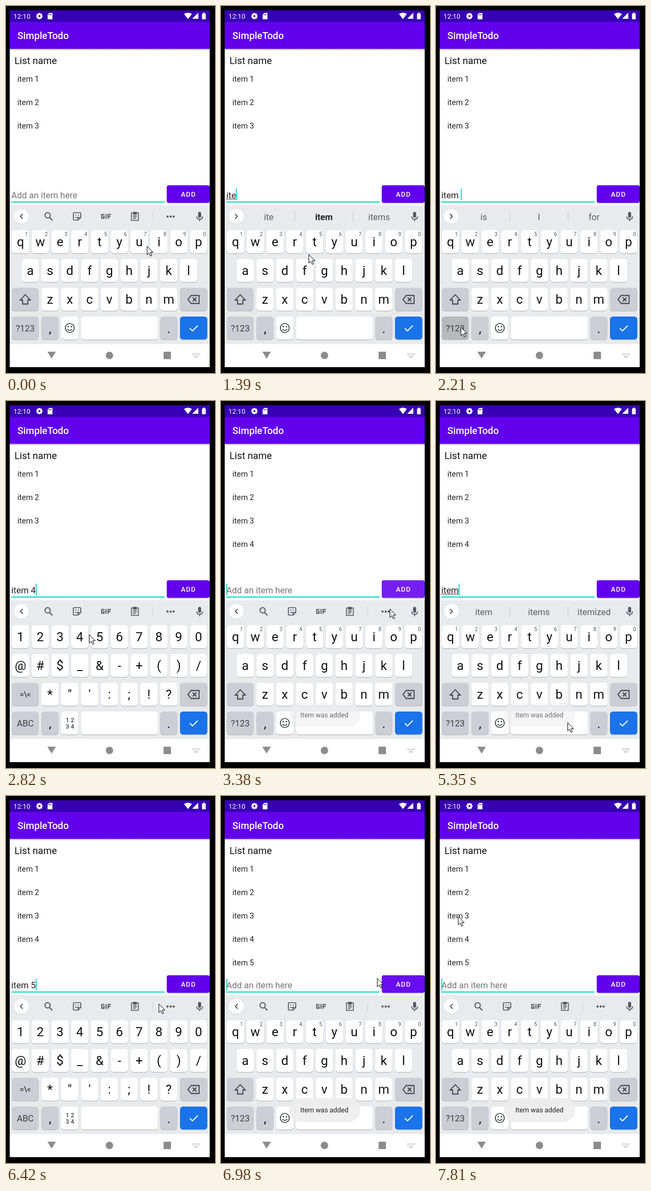
Animation, 394 px wide and 689 px high, one loop 8 s. Source, as an HTML page with a canvas:

```html
<!DOCTYPE html>
<html lang="en">
<head>
<meta charset="utf-8">
<title>Todo list</title>
<style>
html, body { margin: 0; height: 100%; overflow: hidden; background: #000; }
canvas { display: block; }
</style>
</head>
<body>
<canvas id="stage" width="394" height="689"></canvas>
<script>
const g = document.getElementById('stage').getContext('2d');
const LOOP = 8000;
const INK = '#202124', ICON = '#54575b', TEAL = '#03dac5', PURPLE = '#6200ee';

// time, typed text, symbol keyboard, suggestions, list length
const states = [
  [0, '', 0, '', 3],
  [540, 'i', 0, 'in I it', 3],
  [1060, 'it', 0, "its it it's", 3],
  [1310, 'ite', 0, 'ite item items', 3],
  [1670, 'item', 0, 'item items itemized', 3],
  [1930, 'item ', 0, 'is I for', 3],
  [2270, 'item ', 1, 'is I for', 3],
  [2740, 'item 4', 1, '', 3],
  [3160, '', 0, '', 4],
  [3610, 'i', 0, 'in I it', 4],
  [4110, 'it', 0, "its it it's", 4],
  [4520, 'ite', 0, 'ite item items', 4],
  [5080, 'item', 0, 'item items itemized', 4],
  [5440, 'item ', 0, 'is I for', 4],
  [5800, 'item ', 1, 'is I for', 4],
  [6110, 'item 5', 1, '', 4],
  [6660, '', 0, '', 5],
];

// pointer moves: start, end, x, y
const moves = [
  [0, 0, 266, 451], [280, 500, 290, 445], [600, 1010, 178, 446],
  [1080, 1270, 112, 438], [1270, 1630, 316, 547], [1690, 1890, 220, 607],
  [1950, 2170, 47, 603], [2270, 2650, 139, 447], [2760, 3090, 340, 352],
  [3240, 3530, 295, 432], [3640, 4060, 178, 458], [4150, 4460, 107, 445],
  [4560, 5030, 306, 546], [5140, 5360, 248, 604], [5470, 5730, 47, 603],
  [5820, 6080, 178, 455], [6180, 6567, 340, 360], [6760, 7650, 46, 244],
  [7670, 7810, 42, 226],
];

const clamp = v => Math.max(0, Math.min(1, v));
const ramp = (t, a, b) => clamp((t - a) / (b - a));
const ease = u => u * u * (3 - 2 * u);

function box(x, y, w, h, color, r = 0) {
  g.fillStyle = color;
  g.beginPath();
  g.roundRect(x, y, w, h, r);
  g.fill();
}

function disc(x, y, r, color) {
  g.fillStyle = color;
  g.beginPath();
  g.arc(x, y, r, 0, 7);
  g.fill();
}

function text(s, x, y, size, color = INK, align = 'left', weight = 400) {
  g.font = `${weight} ${size}px Roboto, sans-serif`;
  g.fillStyle = color;
  g.textAlign = align;
  g.fillText(s, x, y);
}

// draws an SVG path at x, y: stroked when width is given, filled otherwise
function icon(d, x, y, color, width) {
  const p = new Path2D(d);
  g.save();
  g.translate(x, y);
  g.fillStyle = g.strokeStyle = color;
  g.lineWidth = width || 1;
  if (width) g.stroke(p); else g.fill(p);
  g.restore();
}

function drawStatus() {
  box(7, 8, 377, 22, '#3700b3');
  text('12:10', 14, 24, 12.8, '#fff');
  for (let i = 0; i < 4; i++) {
    g.save();
    g.translate(63, 19);
    g.rotate(i * Math.PI / 4);
    box(-1.5, -6, 3, 12, '#fff', 0.5);
    g.restore();
  }
  disc(63, 19, 4.4, '#fff');
  disc(63, 19, 1.9, '#3700b3');
  icon('M-1.5-6H4.5V6H-4.5V-3Z', 83, 19, '#fff');
  for (const x of [81, 83, 85]) box(x - 0.5, 15, 1, 2.5, '#3700b3');
  icon('M0 6L-7.5-3.5Q0-8.5 7.5-3.5Z', 343, 18.5, '#fff');
  icon('M5.5-6V5.5H-6Z', 357, 18.5, '#fff');
  box(369.5, 14, 7, 11, '#fff', 1);
  box(371.5, 12.5, 3, 2, '#fff');
}

function drawApp(t, s) {
  const [since, typed, , , count] = s;
  box(7, 80, 377, 294, '#fff');
  const shade = g.createLinearGradient(0, 80, 0, 84);
  shade.addColorStop(0, '#0004');
  shade.addColorStop(1, '#0000');
  box(7, 80, 377, 4, shade);
  box(7, 29, 377, 51.5, PURPLE);
  text('SimpleTodo', 21.5, 62, 18.3, '#fff', 'left', 500);
  text('List name', 16, 109, 18.3, '#111');
  for (let i = 0; i < count; i++) text('item ' + (i + 1), 21.5, 142 + 44 * i, 14.67);

  text(typed || 'Add an item here', 10, 360.5, 16.5, typed ? INK : '#757575');
  const w = typed ? g.measureText(typed).width : 0;
  if (typed && !/ /.test(typed)) box(10, 362, w, 1, '#333');
  if (since && (t - since) % 1000 < 500) box(10 + w, 343, 1.8, 22, TEAL);
  box(10, 367, 289, 2, TEAL);

  box(303, 338, 81, 33, '#0003', 4);
  box(303, 336.5, 81, 33, PURPLE, 4);
  for (const c of [3130, 6640]) {
    const glow = ramp(t, c, c + 60) * (1 - ramp(t, c + 240, c + 400));
    if (glow) box(303, 336.5, 81, 33, `rgba(255,255,255,${0.13 * glow})`, 4);
  }
  g.letterSpacing = '1.15px';
  text('ADD', 344, 358, 12.8, '#fff', 'center', 500);
  g.letterSpacing = '0px';
}

function drawTools() {
  icon('M2.5-4.5L-2 0L2.5 4.5', 29, 395, ICON, 1.8);
  icon('M3.5-2A5 5 0 1 1-6.5-2A5 5 0 1 1 3.5-2M2 2L7.5 7.5', 80, 395, ICON, 2);
  icon('M-5.5-7H5.5Q7-7 7-5.5V2L2 7H-5.5Q-7 7-7 5.5V-5.5Q-7-7-5.5-7M7 2H2V7M-3.5 1Q-1 4 2 1', 134, 395, ICON, 1.7);
  disc(131.5, 392.5, 1.1, ICON);
  disc(136.5, 392.5, 1.1, ICON);
  icon('M-2-3.5H-7V3.5H-2.8V0H-4.5M1-4.5V4.5M5 4.5V-3.5H10.5M5 .3H9.5', 187.5, 395, ICON, 2);
  icon('M-6.5-6.5H6.5V7.5H-6.5ZM-3.5-1.5H3.5M-3.5 1.3H3.5M-3.5 4H1.5', 243, 395, ICON, 1.6);
  box(239.5, 386.5, 7, 5, ICON, 1);
  box(276, 386, 1, 19, '#d3d5d8');
  for (const x of [304.5, 310.5, 316]) disc(x, 395.3, 2, ICON);
}

function drawSuggestions(words) {
  icon('M-2.5-4.5L2 0L-2.5 4.5', 29, 395, ICON, 1.8);
  words.split(' ').forEach((word, i) => {
    const bold = word === 'item' && i === 1;
    text(word, 90 + 104 * i, 402, 16.5, bold ? INK : '#5a5d61', 'center', bold ? 700 : 400);
  });
  box(138.5, 384, 1, 22, '#c6c8cb');
  box(248.5, 384, 1, 22, '#c6c8cb');
}

function key(x, row, w, color = '#fff') {
  const y = 421 + 54 * row;
  box(x, y + 1, w, 43.3, '#b9bbbf', 5.5);
  box(x, y, w, 43, color, 5.5);
}

function keyRow(chars, x, row, hints) {
  [...chars].forEach((c, i) => {
    const kx = x + 37.3 * i;
    key(kx, row, 32.5);
    text(c, kx + 16.2, 450.5 + 54 * row, 24, '#111', 'center');
    if (hints) text((i + 1) % 10, kx + 27.5, 432, 10, ICON, 'center');
  });
}

function drawKeyboard(t, s) {
  const symbols = s[2], gray = '#cbced4';
  box(7, 374, 377, 260, '#e8eaed');
  disc(29, 396, 13.8, '#d3d5d8');
  disc(29, 395, 13.8, '#fff');
  if (s[3]) drawSuggestions(s[3]); else drawTools();
  box(362.2, 386.5, 5.6, 11, ICON, 2.8);
  icon('M-5.5 0Q-5.5 5.5 0 5.5Q5.5 5.5 5.5 0M0 5.5V9', 365, 395, ICON, 1.7);

  keyRow(symbols ? '1234567890' : 'qwertyuiop', 11, 0, !symbols);
  keyRow(symbols ? '@#$_&-+()/' : 'asdfghjkl', symbols ? 11 : 29.5, 1);
  keyRow(symbols ? '*"\':;!?' : 'zxcvbnm', 66.7, 2);

  key(11, 2, 50.5, gray);
  if (symbols) text('=\\<', 36.3, 556, 14, '#3c4043', 'center', 500);
  else icon('M0-9L9.5 1H5V8.5H-5V1H-9.5Z', 36.3, 551, '#3c4043', 1.8);
  key(328, 2, 51.5, gray);
  icon('M-4.5-7.5H10.5V7.5H-4.5L-10.5 0ZM-1.5-3.5L5.5 3.5M5.5-3.5L-1.5 3.5', 353.5, 551, '#3c4043', 1.8);

  const down = [2270, 5800].some(e => t >= e - 80 && t < e);
  key(11, 3, 50.5, down ? '#b7babd' : gray);
  text(symbols ? 'ABC' : '?123', 36.3, 610.5, 16.5, '#3c4043', 'center');
  key(66.7, 3, 32.5, gray);
  text(',', 83, 613.5, 24, '#111', 'center');
  key(104, 3, 32.5);
  if (symbols) {
    text('1 2', 120.5, 603, 11.5, '#3c4043', 'center', 500);
    text('3 4', 120.5, 614.5, 11.5, '#3c4043', 'center', 500);
  } else {
    icon('M8.5 0A8.5 8.5 0 1 1-8.5 0A8.5 8.5 0 1 1 8.5 0M-4.5 2Q0 7.5 4.5 2', 120.3, 604.5, '#3c4043', 1.7);
    disc(117.3, 602, 1.4, '#3c4043');
    disc(123.3, 602, 1.4, '#3c4043');
  }
  key(141.3, 3, 145);
  key(290.7, 3, 32.5, gray);
  text('.', 307, 613.5, 24, '#111', 'center');
  key(328, 3, 51.5, '#1a73e8');
  icon('M-7.5 0L-2.5 5L7.5-5', 354, 605, '#fff', 1.9);
}

function drawNav() {
  const c = '#8c8c8c';
  box(7, 634, 377, 44, '#fff');
  box(7, 634, 377, 1, '#f0f0f0');
  icon('M-8-6.5H8L0 6.5Z', 86, 655.5, c);
  disc(195, 656, 7, c);
  box(297, 649, 14, 14, c, 1);
  for (let i = 0; i < 6; i++)
    for (let j = 0; j < 2; j++) box(351 + 2.6 * i, 652 + 2.7 * j, 1.4, 1.4, '#aaa');
  box(354, 658, 8, 1.4, '#aaa');
}

function drawToast(t) {
  const shown = ramp(t, 3290, 3430) * (1 - ramp(t, 5290, 5450)) + ramp(t, 6790, 6930);
  if (!shown) return;
  g.globalAlpha = shown;
  box(128, 567, 134.5, 45, 'rgba(238,238,238,.92)', 22);
  text('Item was added', 149.5, 594, 12.83);
  g.globalAlpha = 1;
}

function drawPointer(t) {
  let [, , x, y] = moves[0];
  for (const [a, b, nx, ny] of moves) {
    if (t < a) break;
    const u = ease(b > a ? ramp(t, a, b) : 1);
    x += (nx - x) * u;
    y += (ny - y) * u;
  }
  const arrow = 'M0 0V16L3.7 12.6L6.2 18.4L8.8 17.3L6.3 11.6H11.2Z';
  icon(arrow, x, y, '#fff');
  icon(arrow, x, y, '#000', 1);
}

function frame(now) {
  const t = now % LOOP;
  const s = states.filter(e => e[0] <= t).pop();
  box(0, 0, 394, 689, '#000');
  drawApp(t, s);
  drawStatus();
  drawKeyboard(t, s);
  drawNav();
  drawToast(t);
  drawPointer(t);
}

const start = performance.now();
function tick() {
  frame(performance.now() - start);
  requestAnimationFrame(tick);
}
tick();
</script>
</body>
</html>
```
